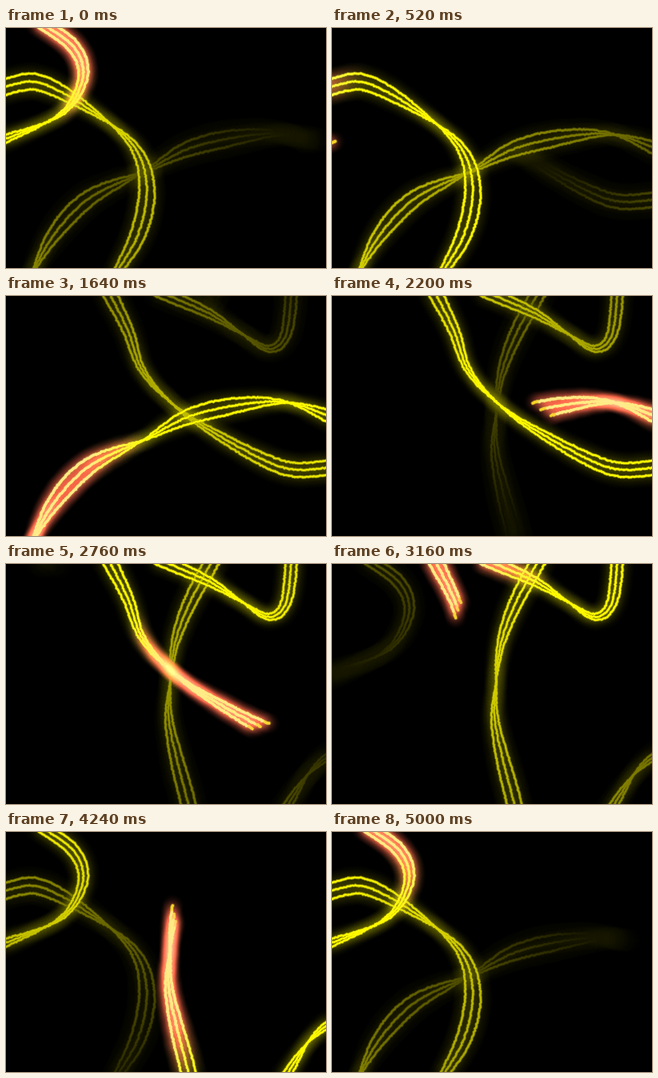
Animation, 400 px wide and 300 px high, one loop 5040 ms. Source, as an HTML page with a canvas:

```html
<!DOCTYPE html>
<html lang="en">
<head>
<meta charset="utf-8">
<title>Light trails</title>
<style>
  html, body { margin: 0; width: 100%; height: 100%; overflow: hidden; background: #000; }
  canvas { display: block; width: 400px; height: 300px; }
</style>
</head>
<body>
<canvas id="stage" width="400" height="300"></canvas>
<script>
const LOOP = 5040, STEP = 40;
const SPEED = 0.56;   // px per ms along a trail
const LIFE = 2440;    // ms from first glimmer to burnout
const FADE = 1600;    // fade-in time
const BURN = 380;     // hot time before burnout
const HEAT = 130;     // time to turn from yellow to hot
const LAG = 15;       // ms between neighbouring strands
const GAP = 2;        // px between samples

const ctx = document.getElementById('stage').getContext('2d');
const strands = [];

let seed = 7;
function jitter(size) {
  seed = (seed * 16807) % 2147483647;
  return (seed / 2147483647 - 0.5) * 2 * size;
}

function spline(a, b, c, d, u) {
  return 0.5 * (2 * b + (c - a) * u + (2 * a - 5 * b + 4 * c - d) * u * u
    + (3 * b - a - 3 * c + d) * u * u * u);
}

// Evenly spaced samples with normals on a smooth curve through key points.
function curve(text) {
  const pts = text.split(' ').map(p => p.split(',').map(Number));
  const at = i => pts[Math.max(0, Math.min(pts.length - 1, i))];
  const out = [];
  let len = 0, [px, py] = pts[0];
  for (let i = 0; i < pts.length - 1; i++) {
    for (let k = 1; k <= 100; k++) {
      const [x, y] = [0, 1].map(n =>
        spline(at(i - 1)[n], at(i)[n], at(i + 1)[n], at(i + 2)[n], k / 100));
      const d = Math.hypot(x - px, y - py);
      len += d;
      if (len >= out.length * GAP) out.push({ x, y, nx: (py - y) / d, ny: (x - px) / d });
      [px, py] = [x, y];
    }
  }
  return out;
}

// Three strands that swing across a shared centre line.
function trail(start, spread, phase, turns, text) {
  const centre = curve(text);
  for (let k = -1; k <= 1; k++) {
    strands.push(centre.map((p, i) => {
      const u = i / centre.length;
      const off = k * spread * Math.cos(Math.PI * (phase + turns * u));
      return {
        x: p.x + p.nx * off + jitter(0.55),
        y: p.y + p.ny * off + jitter(0.55),
        end: start + k * LAG + i * GAP / SPEED
      };
    }));
  }
}

trail(110, 7, -0.18, 0.95, '41,-8 84,23 96,62 68,108 -10,142');
trail(822, 10, -0.13, 1.5, '-8,76 40,68 105,102 160,148 176,200 165,258 137,308');
trail(1675, 10, -0.5, 2.3, '32,308 60,258 105,212 172,180 240,147 340,132 408,152');
trail(2598, 9, -0.02, 0.9, '408,214 345,214 255,168 205,132 170,92 152,42 127,-8');
trail(3395, 7, -0.1, 1.2, '188,-7 250,20 290,44 328,66 350,48 357,-8');
trail(4025, 9, -0.05, 1.1, '260,-8 229,50 211,100 205,150 205,205 230,308');
trail(4820, 5, 0, 0.9, '348,308 371,272 387,253 408,237');

function glow(rgb, r, alpha) {
  const c = document.createElement('canvas');
  c.width = c.height = r * 2;
  const g = c.getContext('2d');
  const fill = g.createRadialGradient(r, r, 0, r, r, r);
  fill.addColorStop(0, `rgba(${rgb},${alpha})`);
  fill.addColorStop(0.5, `rgba(${rgb},${alpha * 0.45})`);
  fill.addColorStop(1, `rgba(${rgb},0)`);
  g.fillStyle = fill;
  g.fillRect(0, 0, r * 2, r * 2);
  return c;
}
const halo = glow('255,255,0', 16, 0.035);
const ember = glow('255,105,75', 14, 0.2);

function stamp(img, p, alpha) {
  const r = img.width / 2;
  ctx.globalAlpha = alpha;
  ctx.drawImage(img, p.x - r, p.y - r);
}

function state(p, t) {
  const left = (((p.end - t) % LOOP) + LOOP) % LOOP;
  if (left > LIFE) return null;
  return {
    left,
    light: Math.min(1, (LIFE - left) / FADE) ** 0.85,
    hot: Math.max(0, Math.min(1, (BURN - left) / HEAT))
  };
}

function line(a, b, rgb, light, width) {
  ctx.strokeStyle = `rgb(${rgb.map(v => Math.round(v * light))})`;
  ctx.lineWidth = width;
  ctx.beginPath();
  ctx.moveTo(a.x, a.y);
  ctx.lineTo(b.x, b.y);
  ctx.stroke();
}

function draw(t) {
  ctx.globalAlpha = 1;
  ctx.globalCompositeOperation = 'source-over';
  ctx.fillStyle = '#000';
  ctx.fillRect(0, 0, 400, 300);

  ctx.globalCompositeOperation = 'lighter';
  for (const samples of strands) {
    for (let i = 0; i < samples.length; i += 2) {
      const s = state(samples[i], t);
      if (!s) continue;
      if (s.hot < 1) stamp(halo, samples[i], s.light ** 1.5 * (1 - s.hot));
      if (s.hot) stamp(ember, samples[i], s.hot);
    }
  }

  // Keeping the brighter colour stops overlapping dim strokes from adding up.
  ctx.globalAlpha = 1;
  ctx.globalCompositeOperation = 'lighten';
  ctx.lineCap = 'round';
  for (const samples of strands) {
    for (let i = 1; i < samples.length; i++) {
      const a = samples[i - 1], b = samples[i], s = state(a, t);
      if (!s || !state(b, t)) continue;
      const rgb = s.left < 14 ? [255, 210, 40] : [255, 250 - 15 * s.hot, 130 * s.hot];
      line(a, b, rgb, s.light * 0.5, 4 + s.hot);
      line(a, b, rgb, s.light, 2.3 + s.hot);
    }
  }
}

let shown = -1;
function tick(now) {
  const t = Math.floor((now % LOOP) / STEP) * STEP;
  if (t !== shown) draw(shown = t);
  requestAnimationFrame(tick);
}
draw(0);
requestAnimationFrame(tick);
</script>
</body>
</html>
```
